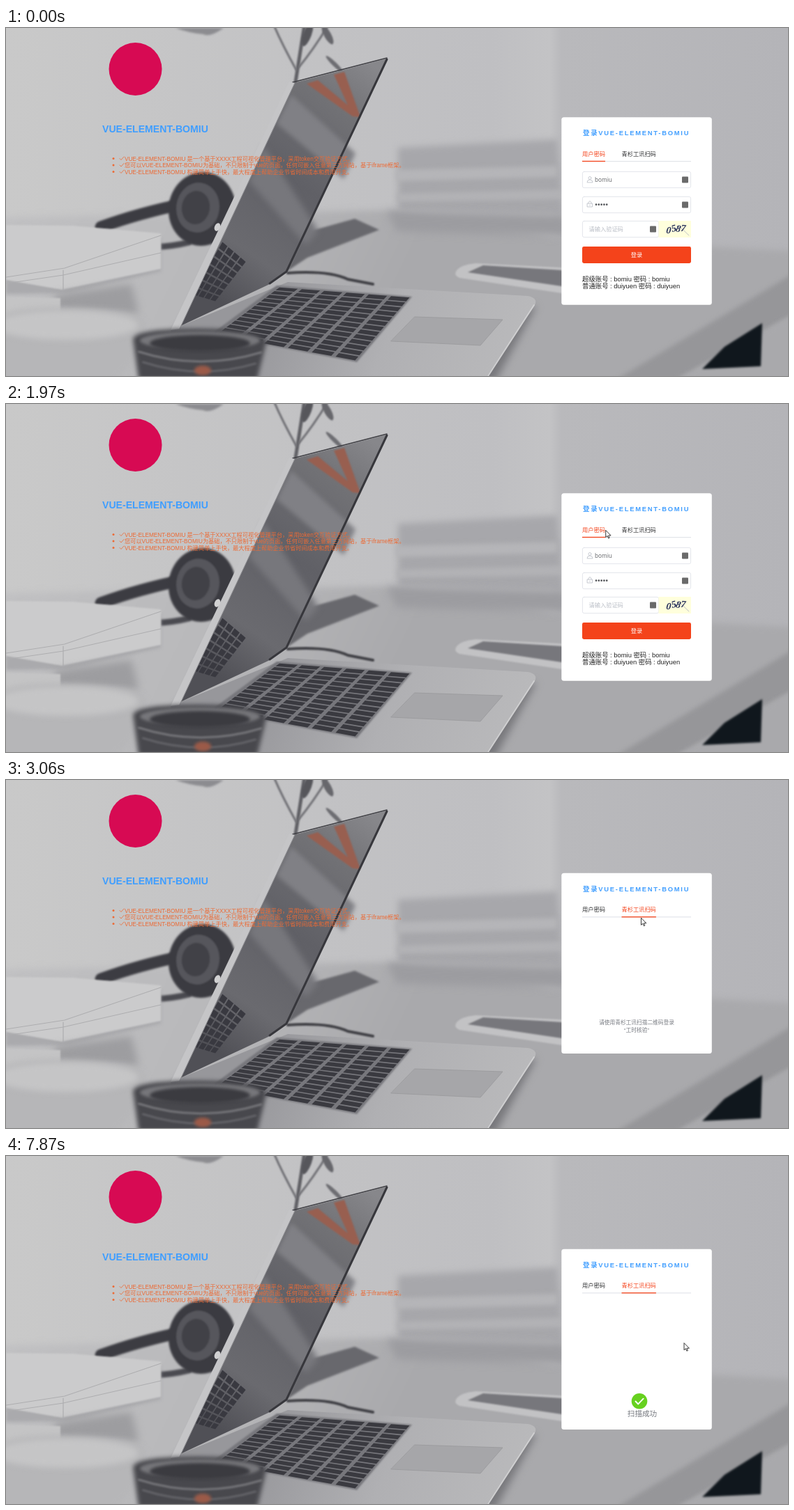
These frames come from a looping animation (1121x500 px, 8 s). An HTML page with a canvas:

```html
<!DOCTYPE html>
<html lang="zh-CN">
<head>
<meta charset="utf-8">
<title>VUE-ELEMENT-BOMIU</title>
<style>
html, body { margin: 0; width: 100%; height: 100%; overflow: hidden; background: #bdbdbf; }
canvas { display: block; width: 1121px; height: 500px; }
</style>
</head>
<body>
<canvas id="stage" width="1121" height="500"></canvas>
<script>
const W = 1121, H = 500, LOOP = 8000, SWITCH = 2750;
const RED = '#f4431b', BLUE = '#409eff', ORANGE = '#ec6a35';
const SANS = '"Liberation Sans", Arial, "Noto Sans CJK SC", "Noto Sans CJK", sans-serif';
const UI = '"Open Sans", "Noto Sans", "Noto Sans CJK SC", "Noto Sans CJK", sans-serif';
const NAME = 'VUE-ELEMENT-BOMIU', USER = 'bomiu', USER2 = 'duiyuen', TAB2 = '青杉工讯扫码';

const stage = document.getElementById('stage').getContext('2d');
const scene = document.createElement('canvas');
scene.width = W;
scene.height = H;
let ctx = scene.getContext('2d');

function shape(color, path, blur = 0) {
  ctx.filter = blur ? `blur(${blur}px)` : 'none';
  ctx.fillStyle = color;
  ctx.fill(new Path2D(path));
  ctx.filter = 'none';
}

function line(color, width, path, blur = 0) {
  ctx.filter = blur ? `blur(${blur}px)` : 'none';
  ctx.strokeStyle = color;
  ctx.lineWidth = width;
  ctx.lineCap = 'round';
  ctx.stroke(new Path2D(path));
  ctx.filter = 'none';
}

function disc(color, x, y, r) {
  ctx.fillStyle = color;
  ctx.beginPath();
  ctx.arc(x, y, r, 0, Math.PI * 2);
  ctx.fill();
}

function oval(color, x, y, rx, ry, angle = 0, blur = 0) {
  ctx.filter = blur ? `blur(${blur}px)` : 'none';
  ctx.fillStyle = color;
  ctx.beginPath();
  ctx.ellipse(x, y, rx, ry, angle, 0, Math.PI * 2);
  ctx.fill();
  ctx.filter = 'none';
}

function box(x, y, w, h, r, fill, stroke) {
  ctx.beginPath();
  ctx.roundRect(x, y, w, h, r);
  if (fill) { ctx.fillStyle = fill; ctx.fill(); }
  if (stroke) { ctx.strokeStyle = stroke; ctx.lineWidth = 0.8; ctx.stroke(); }
}

// Text is placed by its vertical centre.
function text(str, x, cy, size, color, { weight = '', align = 'left', gap = 0, font = SANS } = {}) {
  ctx.font = `${weight} ${size}px ${font}`;
  ctx.letterSpacing = gap + 'px';
  ctx.textAlign = align;
  ctx.fillStyle = color;
  ctx.fillText(str, x, cy + size * 0.37);
  ctx.letterSpacing = '0px';
}

function ramp(x0, y0, x1, y1, ...stops) {
  const g = ctx.createLinearGradient(x0, y0, x1, y1);
  stops.forEach(([at, color]) => g.addColorStop(at, color));
  return g;
}

// Rows of keys inside the quad a-b-c-d.
function keys(a, b, c, d, rows, cols, color) {
  const at = (u, v) => [0, 1].map(i =>
    (1 - v) * (a[i] + (b[i] - a[i]) * u) + v * (d[i] + (c[i] - d[i]) * u));
  for (let r = 0; r < rows; r++) {
    for (let k = 0; k < cols; k++) {
      const u0 = (r + 0.08) / rows, u1 = (r + 0.9) / rows;
      const v0 = (k + 0.08) / cols, v1 = (k + 0.86) / cols;
      shape(color, `M${at(u0, v0)}L${at(u1, v0)}L${at(u1, v1)}L${at(u0, v1)}Z`);
    }
  }
}

function drawRoom() {
  ctx.fillStyle = ramp(0, 0, W, 0, [0, '#c9c9c9'], [0.4, '#c2c2c4'], [0.62, '#bfbfc2'],
    [0.695, '#c3c3c5'], [0.71, '#b9b9bc'], [1, '#b4b4b8']);
  ctx.fillRect(0, 0, W, H);
  shape(ramp(0, 260, 500, 500, [0, '#c0c0c2'], [0.5, '#b9b9bb'], [1, '#a9a9ac']),
    'M-20 272L540 262L800 302L1150 322V520H-20Z', 5);
  shape('#a7a7ab', 'M562 172L790 160L800 268L562 262Z', 5);
  shape('#b5b5b8', 'M558 204L790 198L790 214L560 220Z', 3);
  shape('#b2b2b5', 'M560 238L800 232V246L562 250Z', 3);
  shape('#9c9ca0', 'M545 262L800 268L820 300L560 292Z', 6);
  shape('#969699', 'M1130 352L875 505H960L1130 410Z', 3);
  shape('#a9a9ac', 'M1130 412L965 505H1130Z', 3);
  shape('#10171d', 'M1084 424L1082 486L998 490L1030 458Z', 1.5);
}

function drawPlant() {
  line('#606065', 5, 'M428 -5Q421 40 414 84', 1);
  line('#707075', 3, 'M384 -4Q396 24 416 60M462 -4Q440 32 420 56', 1);
  oval('#56565b', 432, 9, 6, 18, 0.35, 1);
  oval('#67676c', 461, 10, 5, 15, -0.5, 1);
  oval('#6d6d72', 471, 52, 3, 17, -0.8, 1);
  shape('#8c8c90', 'M243 0H312Q292 14 283 9Q262 7 243 0Z', 1.5);
}

function drawLeftSide() {
  line('#3c3c42', 17, 'M136 286Q190 266 258 252', 1.5);
  line('#4a4a50', 9, 'M145 292Q190 326 262 308', 1.5);
  oval('#3b3b41', 281, 260, 48, 53, 0.15, 1.5);
  oval('#56565c', 275, 258, 31, 36, 0.15, 1);
  oval('#414147', 272, 258, 20, 24, 0.15, 1);
  shape('#aaaaad', 'M0 335L222 302V350L90 381L0 382Z', 2);
  shape('#cbcbcc', 'M0 283L95 284L222 295V346L80 376L0 362Z', 0.8);
  line('#aeaeb0', 1.2, 'M0 358L84 345L222 298M0 367L82 355L222 323M82 348V376');
  shape('#9d9da0', 'M70 383L180 368L190 410H70Z', 6);
  shape('#c4c4c5', 'M0 386L78 388V424H0Z', 1);
  shape('#b6b6b8', 'M-10 418Q0 402 90 402Q204 404 200 432Q192 486 150 510H-10Z', 4);
  oval('#c5c5c6', 86, 427, 104, 21, 0, 4);
}

function drawLaptop() {
  shape('#68686d', 'M402 350L428 294L500 274L535 290L432 330Z', 1.5);
  line('#414146', 4, 'M404 352Q462 348 490 361L526 368', 0.8);
  shape('#77777b', 'M246 430L760 400L700 510H230Z', 6);
  shape(ramp(380, 370, 720, 500, [0, '#97979b'], [0.5, '#b0b0b3'], [1, '#b9b9bb']),
    'M404 365L748 385Q763 388 758 398L690 500H250L236 434Z', 0.5);
  line('#d0d0d1', 2, 'M757 398L691 500');
  shape('#77777c', 'M388 370L582 386L503 480L294 440Z', 0.8);
  keys([390, 372], [582, 387], [503, 479], [298, 441], 6, 13, '#3a3a40');
  shape('#a6a6a9', 'M586 415L712 419L680 456L552 450Z');
  line('#98989b', 0.8, 'M586 415L712 419L680 456L552 450Z');

  shape(ramp(520, 50, 290, 380, [0, '#87878b'], [0.2, '#717175'], [0.5, '#606066'],
    [0.8, '#6a6a6f'], [1, '#505056']), 'M412 79L546 44L402 350L378 368L246 430Z');
  shape('#808085', 'M409 96L501 180L484 217L388 137Z', 3);
  shape('#77777c', 'M370 170L448 292L430 312L348 220Z', 4);
  keys([310, 306], [345, 336], [300, 394], [266, 384], 4, 7, '#393940');
  shape('#985f50', 'M431 80L447 75L490 111L470 67L485 63L508 128L497 127Z', 0.8);
  line('#37373c', 3, 'M546 45L402 350L378 367', 0.5);
  line('#3f3f44', 1.6, 'M411 78L546 43');
  shape('#c5c5c7', 'M406 77L414 79L249 432L236 434Z', 0.5);
  line('#8b8b8f', 1, 'M414 79L249 432');
  oval('#d1d1d2', 303, 286, 4, 6, 0.4);
}

function drawForeground() {
  shape('#c2c2c4', 'M645 350Q650 340 674 338L830 346V386L650 359Q642 356 645 350Z', 1);
  shape('#77777c', 'M662 351L684 341L830 350V376Z', 0.8);
  shape('#48484d', 'M182 447Q184 432 277 432Q370 433 373 452L360 505H190Z', 3);
  oval('#77777b', 278, 449, 86, 13, 0, 2);
  oval('#3b3b40', 278, 453, 72, 12, 0, 2);
  line('#8b8b8f', 2, 'M190 465Q277 493 366 466', 1.5);
  line('#707075', 2, 'M196 480Q277 506 358 482', 1.5);
  oval('#9b5a48', 282, 492, 12, 7, 0, 2);
}

function drawIntro() {
  disc('#d70a53', 185.5, 59, 38);
  text(NAME, 138, 144.5, 14.1, BLUE, { weight: 'bold' });
  [
    `${NAME} 是一个基于XXXX工程可视化管理平台，采用token交互验证方式。`,
    `您可以${NAME}为基础，不只限制于vue的页面，任何可嵌入任意第三方网站，基于iframe框架。`,
    `${NAME} 构建简单上手快，最大程度上帮助企业节省时间成本和费用开支。`
  ].forEach((str, i) => {
    const y = 187.5 + i * 9.5;
    disc(ORANGE, 154, y, 1.5);
    line(ORANGE, 0.8, `M163 ${y}l2 2l4 -4.5`);
    text(str, 170, y, 8.2, ORANGE);
  });
}

drawRoom();
drawPlant();
drawLeftSide();
drawLaptop();
drawForeground();
drawIntro();
ctx = stage;

const track = [
  [510, 1055, 458], [760, 1012, 402], [950, 958, 328], [1100, 942, 270], [1240, 928, 226],
  [1320, 926, 216.5], [1400, 924, 215], [1600, 902, 203], [1820, 870, 190], [2040, 855, 178],
  [2200, 855, 178], [2280, 895, 184], [2960, 895, 184], [3280, 944, 230], [3360, 962, 252],
  [3440, 972, 269]
];

function pointerAt(t) {
  if (t < track[0][0]) return { x: -99, y: -99 };
  const i = track.findIndex(k => k[0] > t);
  if (i < 0) return { x: 972, y: 269 };
  const [t0, x0, y0] = track[i - 1], [t1, x1, y1] = track[i];
  const p = (t - t0) / (t1 - t0);
  return { x: x0 + (x1 - x0) * p, y: y0 + (y1 - y0) * p };
}

const inside = (p, x, y, w, h) => p.x >= x && p.x <= x + w && p.y >= y && p.y <= y + h;
const easeInOut = p => p < 0.5 ? 4 * p ** 3 : 1 - (2 - 2 * p) ** 3 / 2;

function drawPointer(p, kind) {
  ctx.save();
  ctx.translate(p.x, p.y);
  if (kind === 'beam') {
    line('#333', 0.9, 'M-2 -5H-0.6L0 -4.4L0.6 -5H2M0 -4.4V4.4M-2 5H-0.6L0 4.4L0.6 5H2');
  } else {
    const path = kind === 'hand'
      ? 'M-1 1Q0 -0.6 1 1V5L4.5 6Q5.6 6.4 5.4 8L4.5 12.5H-1L-4 8.5Q-4.4 6.6 -2.8 7L-1 8.4Z'
      : 'M0 0V9.8L2.3 7.7L3.9 11.2L5.4 10.5L3.9 7.2H7Z';
    shape('#fff', path);
    line('#222', 0.9, path);
  }
  ctx.restore();
}

function drawHead(t, dy, overTab1, overTab2) {
  const second = t >= SWITCH;
  text('登录' + NAME, 827, 151 + dy, 9.4, BLUE, { weight: 'bold', gap: 1.76 });
  text('用户密码', 826, 180.5 + dy, 8.23, !second || overTab1 ? RED : '#303133');
  text(TAB2, 882.5, 180.5 + dy, 8.23, second || overTab2 ? RED : '#303133');
  ctx.fillStyle = '#e0e3e8';
  ctx.fillRect(826, 191 + dy, 156, 1.1);
  const slide = easeInOut(Math.min(1, Math.max(0, (t - SWITCH) / 300)));
  ctx.fillStyle = RED;
  ctx.fillRect(826 + 56.5 * slide, 190.8 + dy, second ? 49.4 : 33, 1.3);
}

function drawField(y, w, hover) {
  box(826.4, y + 0.4, w - 0.8, 23.2, 2.4, '#fff', '#dcdfe6');
  box(826 + w - 13, y + 7.5, 9, 9, 1, hover ? '#000' : '#6a6a6a');
}

function drawForm(over) {
  drawField(206, 156, over.name);
  line('#b9bdc6', 0.8, 'M833 221.5Q833 218 837 218Q841 218 841 221.5ZM839 215.5A2 2 0 1 1 835 215.5A2 2 0 1 1 839 215.5');
  text(USER, 844, 218, 8.23, '#606266', { font: UI });

  drawField(242, 156, over.pass);
  line('#b9bdc6', 0.8, 'M833.5 252H840.5V257H833.5ZM835 252V250.5Q837 247 839 250.5V252M837 254V255.3');
  for (let i = 0; i < 5; i++) disc('#55575b', 846 + i * 3.8, 253.7, 1.35);

  drawField(277, 110, over.code);
  text('请输入验证码', 835.5, 289, 8.23, '#b9bdc5');
  ctx.fillStyle = '#ffffdc';
  ctx.fillRect(935.5, 277, 46.5, 24);
  line('#b9bcc4', 0.9, 'M962 284Q972 290 979 298');
  [...'0587'].forEach((digit, i) => {
    ctx.save();
    ctx.translate(950 + i * 7, [290, 287, 287.5, 287][i]);
    ctx.rotate([0.1, -0.25, 0.2, 0.1][i]);
    text(digit, 0, 0, 14, '#27305a', {
      weight: 'italic bold', align: 'center', font: '"Liberation Serif", "Times New Roman", serif'
    });
    ctx.restore();
  });

  box(826, 314, 156, 24, 2.4, over.button ? '#f6694a' : RED);
  text('登录', 904, 326, 8.23, '#fff', { weight: '500', align: 'center' });
  text(`超级账号 : ${USER} 密码 : ${USER}`, 826, 360.5, 9.4, '#222');
  text(`普通账号 : ${USER2} 密码 : ${USER2}`, 826, 371, 9.4, '#222');
}

function drawScan(t) {
  if (t < 7700) {
    const style = { align: 'center' };
    text('请使用青杉工讯扫描二维码登录', 904, 348, 7.7, '#777a80', style);
    text('“工时核验”', 904, 359.5, 7.7, '#777a80', style);
    return;
  }
  const [r, alpha, x] = t < 7800 ? [4.2, 0.4, 906] : t < 7870 ? [9, 0.75, 909.5] : [11.3, 1, 912];
  ctx.globalAlpha = t < 7800 ? 0.6 : alpha;
  disc('#67d11f', 908, 352.3, r);
  ctx.save();
  ctx.translate(908, 352.3);
  ctx.scale(r / 11.3, r / 11.3);
  line('#fff', 1.9, 'M-5.5 0.2L-1.8 4L5.6 -3.6');
  ctx.restore();
  ctx.globalAlpha = alpha;
  text('扫描成功', x, 370.5, 10.6, '#777a80', { align: 'center' });
  ctx.globalAlpha = 1;
}

function draw(t) {
  const form = t < SWITCH, dy = form ? 0 : 5.3;
  const p = pointerAt(t);
  const overTab1 = inside(p, 826, 174 + dy, 33, 16);
  const overTab2 = inside(p, 882, 174, 50, 22);
  const over = {
    name: form && inside(p, 826, 206, 156, 24),
    pass: form && inside(p, 826, 242, 156, 24),
    code: form && inside(p, 826, 277, 109, 24),
    image: form && inside(p, 935, 277, 47, 24),
    button: form && inside(p, 826, 314, 156, 24)
  };

  ctx.drawImage(scene, 0, 0);
  if (form) box(796.3, 128.3, 215.5, 269.5, 3.5, '#fff');
  else box(796.3, 133.8, 215.5, 259.2, 3.5, '#fff');
  drawHead(t, dy, overTab1, overTab2);
  if (form) drawForm(over);
  else drawScan(t);

  if (t >= 2510 && t < SWITCH) {
    ctx.globalCompositeOperation = 'multiply';
    disc('#fbee35', 894, 185, t < 2590 ? 5 : 7);
    ctx.globalCompositeOperation = 'source-over';
  }
  if (t >= 510) {
    const kind = over.name || over.pass || over.code ? 'beam'
      : overTab1 || overTab2 || over.image || over.button ? 'hand' : 'arrow';
    drawPointer(p, kind);
  }
}

const start = performance.now();
function tick() {
  draw((performance.now() - start) % LOOP);
  requestAnimationFrame(tick);
}
tick();
</script>
</body>
</html>
```
